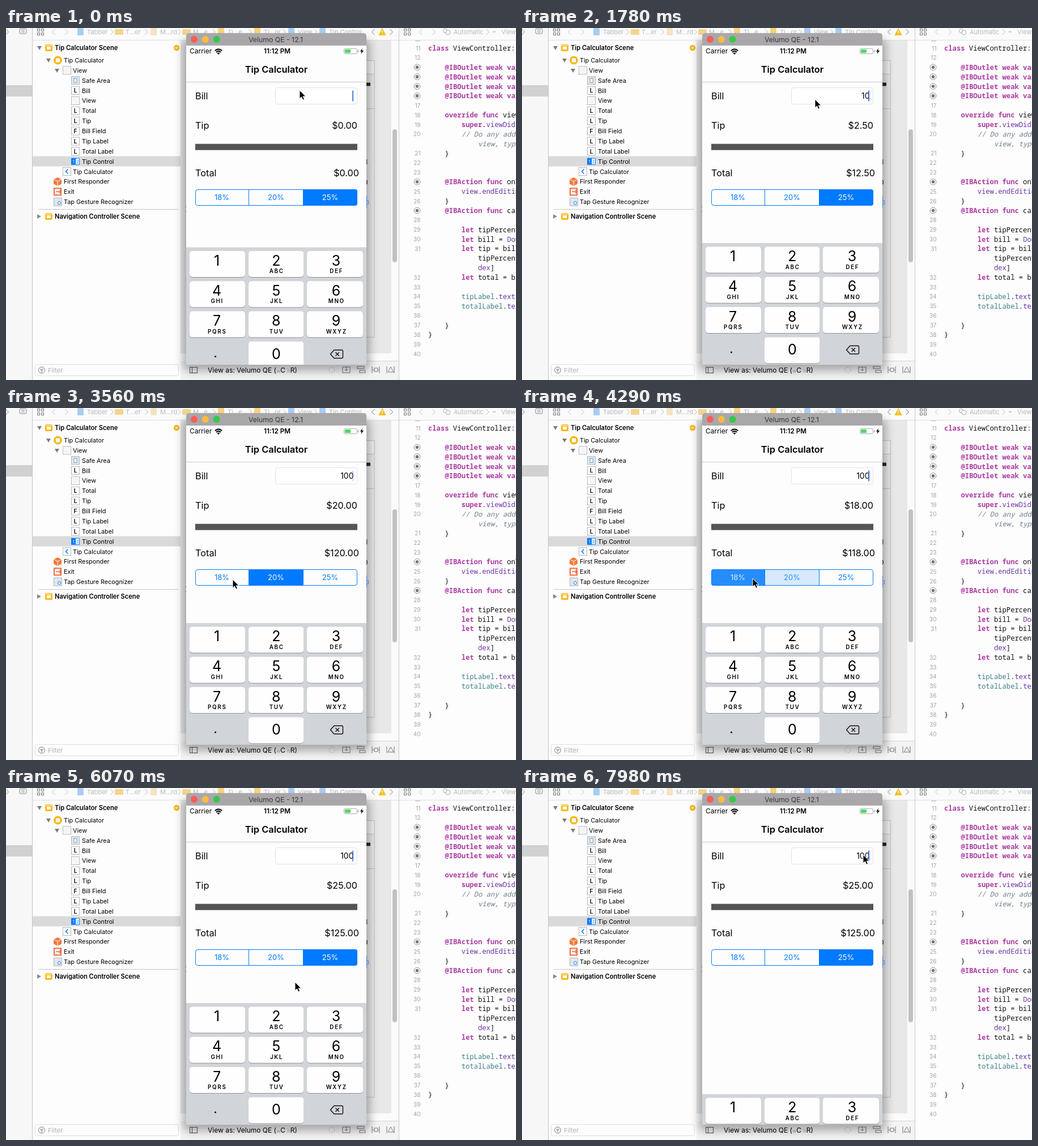
Write an HTML page that moves like this. It is 900 px wide and 622 px high and loops after 8000 ms.

```html
<!DOCTYPE html>
<html lang="en">
<head>
<meta charset="utf-8">
<title>Tip calculator demo</title>
<style>
  html, body { margin: 0; width: 100%; height: 100%; overflow: hidden; background: #fdfdfd; }
  svg { display: block; width: 900px; height: 622px; font-family: Inter, Roboto, sans-serif; }
  text { white-space: pre; }
  .code { font: 12.2px "Noto Sans Mono", "DejaVu Sans Mono", monospace; }
  .line { fill: none; stroke-width: 1; }
</style>
</head>
<body>
<svg id="stage" viewBox="0 0 900 622" xmlns="http://www.w3.org/2000/svg"></svg>
<script>
const LOOP = 8000, BEAT = 147.5, BLUE = '#007aff';
const DEVICE = 'Velumo QE';

const rect = (x, y, w, h, fill, extra = '') =>
  `<rect x="${x}" y="${y}" width="${w}" height="${h}" fill="${fill}" ${extra}/>`;
const text = (x, y, size, str, extra = '') =>
  `<text x="${x}" y="${y}" font-size="${size}" ${extra}>${str}</text>`;
const path = (d, stroke, extra = '') =>
  `<path class="line" d="${d}" stroke="${stroke}" ${extra}/>`;
const circle = (x, y, r, fill, extra = '') =>
  `<circle cx="${x}" cy="${y}" r="${r}" fill="${fill}" ${extra}/>`;
const chevron = (x, y, dir, color, size = 4) =>
  path(`M${x - dir * size / 2} ${y - size}l${dir * size} ${size}l${-dir * size} ${size}`, color);
const MID = ' text-anchor="middle"', END = ' text-anchor="end"', SEMI = ' font-weight="600"';

function grid(x) {
  let out = '';
  for (const dx of [0, 7]) for (const dy of [0, 7])
    out += rect(x + dx + .5, 1.5 + dy, 4, 4, 'none', 'stroke="#777"');
  return out;
}

function toolbar() {
  const grey = '#b9b9b9', fill = `fill="${grey}"`;
  const crumbs = [[143, 'Tabber'], [211, 'T...er'], [272, 'M...rd'], [330, 'M...e'],
    [391, 'Ti...e'], [455, 'Ti...or'], [515, 'View'], [570, 'Tip Control']];
  let out = rect(0, 0, 900, 21, '#fbfbfb') + path('M46 21.5H900', '#dedede') + grid(55) + grid(702);
  crumbs.forEach(([x, label], i) => {
    const folder = i === 1 || i === 3;
    out += text(x, 11, 11, label, fill) +
      rect(x - (folder ? 19 : 17), folder ? 2 : 0, folder ? 15 : 11, folder ? 10 : 13,
        folder ? '#f3d58c' : i === 2 ? '#f4e3c4' : i === 4 || i === 5 ? '#f8d37c' : '#a9cdf3', 'rx="1.5"');
    if (i) out += chevron(x - 24, 7, 1, grey, 5);
  });
  out += [[84, -1], [107, 1], [732, -1], [755, 1]].map(([x, d]) => chevron(x, 7, d, '#c3c3c3', 5)).join('');
  out += chevron(648, 7, -1, '#777', 5) + chevron(680, 7, 1, '#777', 5) +
    '<path d="M664 1l6 11.5h-12z" fill="#f6bd22" stroke="#f6bd22" stroke-linejoin="round"/>' +
    rect(663.4, 4, 1.2, 4.5, '#fff') + rect(663.4, 9.5, 1.2, 1.3, '#fff');
  out += circle(775, 5, 3.5, 'none', 'stroke="#aaa"') + circle(780, 8, 4, '#fbfbfb', 'stroke="#aaa"') +
    text(790, 11, 11, 'Automatic', fill) + chevron(850, 7, 1, grey, 5) +
    rect(859, 6, 5, 1.5, grey) + text(874, 11, 11, 'View', fill);
  return out;
}

function outline() {
  const rows = [[84, 'scene', 'Tip Calculator'], [100, 'view', 'View'], [115, 'area', 'Safe Area'],
    [115, 'L', 'Bill'], [115, 'view', 'View'], [115, 'L', 'Total'], [115, 'L', 'Tip'], [115, 'F', 'Bill Field'],
    [115, 'L', 'Tip Label'], [115, 'L', 'Total Label'], [115, 'seg', 'Tip Control'], [100, 'back', 'Tip Calculator'],
    [84, 'cube', 'First Responder'], [84, 'exit', 'Exit'], [84, 'tap', 'Tap Gesture Recognizer']];
  const box = (x, y, fill = '#fff') => rect(x + .5, y - 7, 14, 14, fill, 'stroke="#b4b4b4"');
  const icons = {
    scene: (x, y) => circle(x + 7.5, y, 7.5, '#f8b91b') + rect(x + 4, y - 3.5, 7, 7, '#fff', 'rx="1"'),
    view: (x, y) => box(x, y) + rect(x + 2, y - 5.5, 11, 11, '#f5f5f5'),
    area: (x, y) => box(x, y, '#dce7ef') + rect(x + 5, y - 3.5, 5, 7, '#fff', 'stroke="#7d9bb5"'),
    seg: (x, y) => rect(x, y - 6, 15, 12, BLUE, 'rx="1"') + rect(x + 8, y - 5, 6, 10, '#fff') +
      text(x + 2.5, y + 3, 7, '1', 'fill="#fff"') + text(x + 9, y + 3, 7, '2', `fill="${BLUE}"`),
    back: (x, y) => box(x, y) + path(`M${x + 9.5} ${y - 4}l-4 4l4 4`, BLUE, 'style="stroke-width:1.5"'),
    cube: (x, y) => `<path d="M${x} ${y - 4}l7-3.5 7 3.5v8l-7 3.5-7-3.5z" fill="#f17a3c"/>` +
      path(`M${x} ${y - 4}l7 3.5 7-3.5m-7 3.5v7.5`, '#fff'),
    exit: (x, y) => rect(x + 1, y - 6, 12, 12, 'none', 'stroke="#ee6a3a" stroke-width="2"') +
      path(`M${x + 4} ${y}h9m-3-3l3 3l-3 3`, '#ee6a3a', 'style="stroke-width:1.5"'),
    tap: (x, y) => box(x, y, '#dfe6ee') + circle(x + 10, y + 2, 2.5, '#fff', `stroke="${BLUE}"`)
  };
  const open = (x, y) => `<path d="M${x} ${y - 3}h8l-4 7z" fill="#7d7d7d"/>`;
  const sceneIcon = y => rect(69, y - 6, 13, 12, '#f8b91b', 'rx="2"') + rect(72, y - 2, 7, 5, '#fff') +
    rect(70, y - 4.5, 11, 1, '#fff');
  let out = rect(0, 0, 46, 622, '#f7f7f7') + rect(0, 101, 46, 20, '#d1d1d1') +
    path('M46.5 0V622', '#c4c4c4') + rect(47, 226.5, 261, 18, '#dadada');
  out += chevron(2, 7, 1, '#888', 5) + rect(24, 1, 12, 9, 'none', 'rx="2" stroke="#888"') +
    path('M27 4h6m-6 3h6', '#888');
  out += open(55, 35) + open(71, 57) + open(86, 75) + '<path d="M55 329v8l7-4z" fill="#8a8a8a"/>' +
    sceneIcon(35) + sceneIcon(333) +
    text(86, 39, 11.1, 'Tip Calculator Scene', SEMI) + text(86, 337, 11.1, 'Navigation Controller Scene', SEMI) +
    circle(301, 35, 5.2, '#f6b820') + path('M298 35h5m-2-2l2 2l-2 2', '#fff');
  rows.forEach(([x, kind, label], i) => {
    const y = 57 + 17.87 * i;
    out += icons[kind] ? icons[kind](x, y) : box(x, y) + text(x + 7.5, y + 3.7, 10, kind, MID + SEMI);
    out += text(x + (x === 115 ? 19 : 18), y + 4, 10.8, label);
  });
  return out + path('M57 320.5H304', '#c6c6c6') +
    rect(51.5, 594.5, 253, 20, '#fdfdfd', 'rx="3" stroke="#dedede"') +
    circle(63, 604.5, 5.5, 'none', 'stroke="#777"') + path('M60 603h6m-5 2h4m-3 2h2', '#777') +
    text(74, 608.5, 11, 'Filter', 'fill="#b0b0b0"');
}

function canvasPane() {
  const icon = '#777', stroke = `stroke="${icon}"`;
  return rect(308, 22, 385, 567, '#fbfbfb') + rect(308, 22, 372, 553, '#e8e8e8') +
    rect(308, 589, 385, 33, '#f3f3f3') + path('M636 588.5H693', '#d4d4d4') +
    rect(630, 57.5, 20, 489, '#e9e9e9', 'stroke="#bdbdbd"') +
    rect(620, 57.5, 30, 24, '#f1f1f1', 'rx="2" stroke="#c2c2c2"') +
    path('M636 142.5H650', '#c0c0c0') +
    rect(682, 179, 8, 235, '#c1c1c1', 'rx="4"') + path('M693.5 0V622', '#c9c9c9') +
    circle(575, 604, 5, 'none', 'stroke="#bbb" stroke-dasharray="3 2"') +
    rect(594, 599, 13, 10, 'none', stroke) + path('M600.5 598v8m-3-3l3 3l3-3', icon) +
    rect(620, 598, 12, 4, 'none', stroke) + rect(624, 605, 10, 4, 'none', stroke) +
    path('M646 598v12m13-12v12m-13-6h13', icon) + rect(650, 601, 6, 6, '#f3f3f3', stroke) +
    path('M672 598v12m13-12v12m-11-2l5-9l5 9z', icon);
}

function editor() {
  const indents = [745, 774.4, 803.7, 833];
  const colors = { k: '#ad3da4', u: '#6c36a9', t: '#3e8087', c: '#707f8c', p: '#111' };
  const styles = { k: SEMI, c: ' font-style="italic"' };
  const outlet = ['o', 1, 'k@IBOutlet weak var'];
  const blank = n => [n, 0];
  const lines = [[11, 0, 'kclass', 'p ViewController:'], blank(12), outlet, outlet, outlet, outlet, blank(17),
    [18, 1, 'koverride func', 'p viewDidLoad'], [19, 2, 'ksuper', 'p.', 'uviewDidLoad'],
    [20, 2, 'c// Do any additional'], ['', 3, 'cview, typically'], [21, 1, 'p}'], blank(22), blank(23),
    ['o', 1, 'k@IBAction func', 'p onTap'], [25, 2, 'uview', 'p.', 'uendEditing'], [26, 1, 'p}'],
    ['o', 1, 'k@IBAction func', 'p calculate'], blank(28), [29, 2, 'klet', 'p tipPercentages'],
    [30, 2, 'klet', 'p bill = ', 'uDouble'], [31, 2, 'klet', 'p tip = bill'], ['', 3, 'ptipPercentages'],
    ['', 3, 'udex', 'p]'], [32, 2, 'klet', 'p total = bill'], blank(33), [34, 2, 'ttipLabel', 'p.', 'utext'],
    [35, 2, 'ttotalLabel', 'p.', 'utext'], blank(36), [37, 1, 'p}'], [38, 0, 'p}'], blank(39), blank(40)];
  const span = s => `<tspan fill="${colors[s[0]]}"${styles[s[0]] || ''}>${s.slice(1)}</tspan>`;
  let out = rect(694, 22, 206, 600, '#fdfdfd') + rect(722, 22, 9, 1.5, '#ccc');
  lines.forEach(([num, indent, ...spans], i) => {
    const y = 36 + 16.88 * i;
    out += num === 'o'
      ? circle(725.5, y - .5, 5.3, 'none', 'stroke="#8a8a8a"') + circle(725.5, y - .5, 2.8, '#777')
      : text(731.5, y + 3.5, 10, num, END + ' fill="#a3a3a3"');
    out += `<text class="code" x="${indents[indent]}" y="${y + 4}">${spans.map(span).join('')}</text>`;
  });
  return out;
}

function keypad() {
  const letters = ['', 'ABC', 'DEF', 'GHI', 'JKL', 'MNO', 'PQRS', 'TUV', 'WXYZ'];
  const lefts = [324, 428, 531], widths = [98, 97.5, 99], centers = [372, 476.8, 582.5];
  let out = rect(318, 380, 318, 230, '#d1d4d9');
  const key = (digit, col, row, sub) => {
    const y = 386.5 + 53.3 * row;
    out += rect(lefts[col], y + 1, widths[col], 46, '#8f9297', 'rx="5"') +
      rect(lefts[col], y, widths[col], 46, '#fefefe', 'rx="5"') +
      text(centers[col], y + (row === 3 ? 31 : 25.5), 25, digit, MID) +
      text(centers[col] + .8, y + 39, 9.8, sub, MID + SEMI + ' letter-spacing="1.7"');
  };
  letters.forEach((sub, i) => key(i + 1, i % 3, Math.floor(i / 3), sub));
  key(0, 1, 3, '');
  return out + circle(369.5, 573, 1.6, '#111') +
    path('M579 561.5h13.5q2 0 2 2v10.5q0 2-2 2h-13.5l-6.5-7.3z', '#111', 'style="stroke-width:1.4" stroke-linejoin="round"') +
    path('M581.5 565.5l6.5 6.5m0-6.5l-6.5 6.5', '#111', 'style="stroke-width:1.4"');
}

function phone() {
  const lights = ['#fc5b57', '#fdbc40', '#34c84a'];
  let out = '<rect x="312" y="20" width="330" height="586" rx="8" opacity=".3" filter="url(#blur)"/>' +
    text(356, 609, 12, `View as: ${DEVICE} (<tspan font-size="9" fill="#888">w</tspan>C <tspan font-size="9" fill="#888">h</tspan>R)`) +
    rect(324.5, 599.5, 13, 10, 'none', 'stroke="#444"') + path('M328.5 600v10', '#444') +
    path('M317 315l4 5l-4 5', '#555') +
    rect(634, 96.5, 9, 6, '#222', 'rx="1"') + rect(636, 232, 1.5, 9, '#555') +
    text(631, 277, 12, '0') + path('M636.5 296v22m0-13h3v6h-3', '#4a7fe0');
  out += rect(318, 9, 318, 586, '#fdfdfd', 'rx="4"') +
    '<path d="M318 31V14q0-5 5-5h308q5 0 5 5v17z" fill="#a9a7a9"/>' +
    lights.map((c, i) => circle(332 + 19.8 * i, 20, 6, c)).join('') +
    text(476, 24.5, 12.3, `${DEVICE} - 12.1`, MID + ' fill="#3b393b"');
  out += text(324, 45, 12, 'Carrier') + text(478.5, 45, 11.7, '11:12 PM', MID + SEMI) +
    path('M368.7 40.2q6.3-5.6 12.6 0m-10.5 2.6q4.2-3.8 8.4 0', '#111', 'style="stroke-width:2"') +
    '<path d="M372.5 44.4q2.5-2 5 0l-2.5 2.6z"/>' +
    rect(596.5, 36.5, 23, 9, '#fff', 'rx="2.5" stroke="#aaa"') + rect(598, 38, 10, 6, '#4cd964', 'rx="1"') +
    rect(621, 39, 1.5, 4, '#aaa') + '<path d="M629 36l-4 5.5h2.5l-1 4.5l4.5-6h-2.7z"/>' +
    text(477, 78.5, 16.4, 'Tip Calculator', MID + SEMI) + path('M318 95.5H636', '#c8c8c8');
  out += text(334, 126, 16.3, 'Bill') + text(334, 177.5, 16.3, 'Tip') + text(334, 262, 16.3, 'Total') +
    rect(475.5, 105.5, 144, 29, '#fff', 'rx="4" stroke="#e2e2e2"') +
    text(613.5, 125, 14, '', END + ' id="bill"') +
    rect(611.3, 110.5, 1.7, 19, '#3565d8', 'id="caret"') +
    text(620, 177.5, 16.2, '', END + ' id="tip"') + text(623, 262, 16.2, '', END + ' id="total"') +
    rect(334, 204.7, 286, 11, '#555');
  out += '<g clip-path="url(#segClip)">' +
    [334, 428.5, 524].map((x, i) => rect(x, 285, [94.5, 95.5, 96][i], 29, BLUE, `id="seg${i}"`)).join('') + '</g>' +
    rect(334.5, 285.5, 285, 28, 'none', `rx="4" stroke="${BLUE}"`) + path('M428.5 286v28M524.5 286v28', BLUE) +
    ['18%', '20%', '25%'].map((s, i) => text([381, 476.5, 572][i], 304.3, 13, s, MID + ` id="label${i}"`)).join('');
  return out + `<g clip-path="url(#screen)"><g id="keys">${keypad()}</g></g>`;
}

document.getElementById('stage').innerHTML =
  `<defs><filter id="blur" x="-20%" y="-20%" width="140%" height="140%"><feGaussianBlur stdDeviation="8"/></filter>
   <clipPath id="screen">${rect(318, 31, 318, 564, '#000')}</clipPath>
   <clipPath id="segClip">${rect(334, 285, 286, 29, '#000', 'rx="4"')}</clipPath></defs>` +
  rect(0, 0, 900, 622, '#fdfdfd') + toolbar() + outline() + canvasPane() + editor() + phone() +
  '<path id="cursor" d="M0 0V15l3.5-3.2L5.9 17.2l2.6-1.1L6.2 10.9H11z" fill="#000" stroke="#fff"/>';

const ui = Object.fromEntries([...document.querySelectorAll('[id]')].map(n => [n.id, n]));

// Keyframes are [beat, ...values].
const POINTER = [[0, 518, 110], [2, 517, 126], [16, 517, 126], [20, 474, 297], [22, 474, 297], [24, 400, 303],
  [26, 402, 306], [29, 407, 301], [30, 407, 301], [33, 552, 299], [35, 556, 299], [39, 556, 299], [41, 510, 343],
  [42, 510, 343], [45, 594, 120], [48, 590, 118], [50, 470, 18], [52, 602, 118], [54, 602, 118]];
const SLIDE = [[0, 7.5], [1, 2], [3, 0], [42, 0], [43, 150], [44, 216], [53, 216], [54, 161]];
const TYPED = [[0, ''], [7, '1'], [12, '10'], [13, '100']];
const CHOICE = [[-9, 2], [21, 1], [28, 0], [33, 2]];
const RATES = [.18, .2, .25];

const lastIndex = (keys, beat) => keys.findLastIndex(k => k[0] <= beat);

function sample(keys, beat) {
  const i = lastIndex(keys, beat), a = keys[i], b = keys[i + 1];
  if (!b) return a.slice(1);
  const u = (beat - a[0]) / (b[0] - a[0]), e = u * u * (3 - 2 * u);
  return a.slice(1).map((v, j) => v + (b[j + 1] - v) * e);
}

function caretOpacity(beat) {
  if (beat >= 42 && beat < 54) return 0;
  if (beat < 16 || beat >= 54) return 1;
  const p = ((beat - 24.3) / 6.76 + 9) % 1;
  return Math.max(0, Math.min(1, (p - .33) / .15, (1 - p) / .15));
}

function render(time) {
  const beat = Math.floor(time % LOOP / BEAT);
  const bill = TYPED[lastIndex(TYPED, beat)][1];
  const c = lastIndex(CHOICE, beat), [since, chosen] = CHOICE[c];
  const fade = Math.min(1, .4 + .45 * (beat - since));
  const tip = bill * RATES[chosen];

  ui.bill.textContent = bill;
  ui.tip.textContent = '$' + tip.toFixed(2);
  ui.total.textContent = '$' + (+bill + tip).toFixed(2);
  ui.caret.setAttribute('opacity', caretOpacity(beat));
  for (let i = 0; i < 3; i++) {
    const on = i === chosen ? fade : c && i === CHOICE[c - 1][1] ? 1 - fade : 0;
    ui['seg' + i].setAttribute('opacity', on);
    ui['label' + i].setAttribute('fill', `rgb(${255 * on},${122 + 133 * on},255)`);
  }
  ui.keys.setAttribute('transform', `translate(0 ${sample(SLIDE, beat)})`);
  ui.cursor.setAttribute('transform', `translate(${sample(POINTER, beat).join(' ')})`);
}

const start = performance.now();
function tick() {
  render(performance.now() - start);
  requestAnimationFrame(tick);
}
tick();
</script>
</body>
</html>
```
